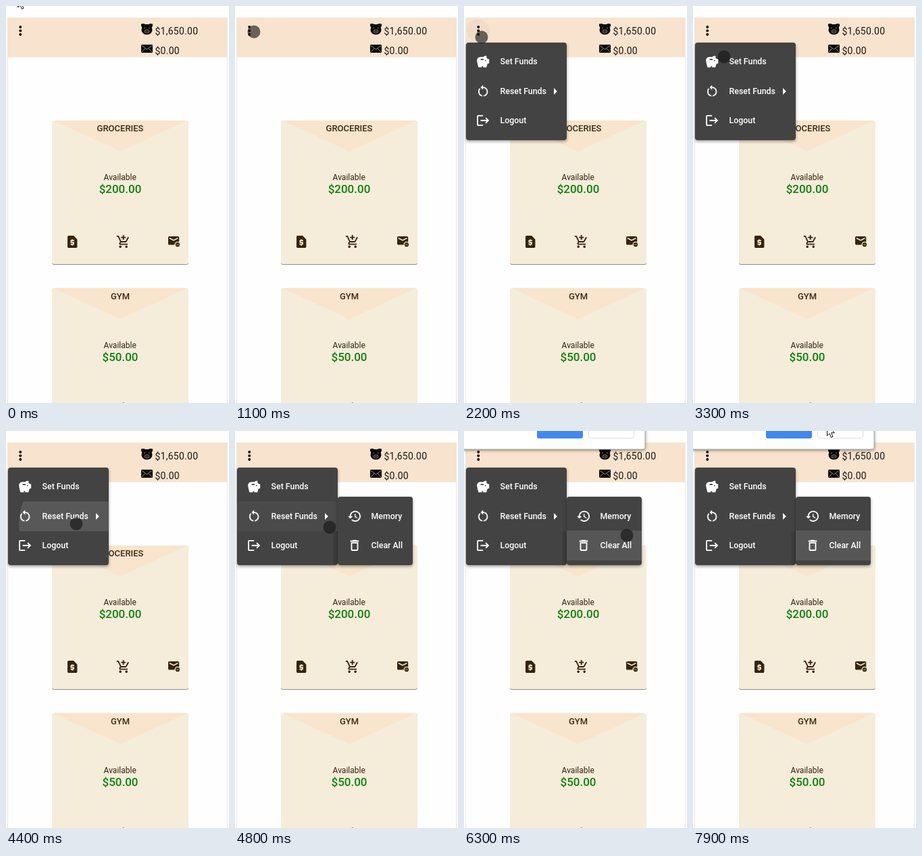
Animation, 330 px wide and 586 px high, one loop 8 s. Source, as an HTML page:

```html
<!DOCTYPE html>
<html lang="en">
<head>
<meta charset="utf-8">
<title>Envelope budget</title>
<style>
html, body { margin: 0; width: 100%; height: 100%; overflow: hidden; background: #fefefe; }
svg { display: block; width: 330px; height: 586px; font-family: Roboto, sans-serif; }
.funds { font-size: 14px; letter-spacing: .25px; fill: #1c1713; }
.name { font-size: 13px; font-weight: 500; text-anchor: middle; fill: #3a2914; }
.label { font-size: 12px; text-anchor: middle; fill: #33230f; }
.price { font-size: 17px; font-weight: 500; text-anchor: middle; fill: #10800f; }
.item { font-size: 12.4px; font-weight: 500; fill: #fff; }
.panel { fill: #434343; filter: drop-shadow(0 2px 2px rgba(0,0,0,.38)); }
.light { fill: #fff; }
.dark { fill: #36240c; }
</style>
</head>
<body>
<svg viewBox="0 0 330 586">
  <defs>
    <path id="quote" d="M14 2H6c-1.1 0-2 .9-2 2v16c0 1.1.9 2 2 2h12c1.1 0 2-.9 2-2V8l-6-6zm1 9h-4v1h3c.55 0 1 .45 1 1v3c0 .55-.45 1-1 1h-1v1h-2v-1H9v-2h4v-1h-3c-.55 0-1-.45-1-1v-3c0-.55.45-1 1-1h1V8h2v1h2v2z"/>
    <path id="cart" d="M11 9h2V6h3V4h-3V1h-2v3H8v2h3v3zm-4 9c-1.1 0-2 .9-2 2s.9 2 2 2 2-.9 2-2-.9-2-2-2zm10 0c-1.1 0-2 .9-2 2s.9 2 2 2 2-.9 2-2-.9-2-2-2zm-9.83-3.25l.03-.12.9-1.63h7.45c.75 0 1.41-.41 1.75-1.03l3.86-7.01L19.42 4h-.01l-1.1 2-2.76 5H8.53l-.13-.27L6.16 6l-.95-2-.94-2H1v2h2l3.6 7.59-1.35 2.45c-.16.28-.25.61-.25.96 0 1.1.9 2 2 2h12v-2H7.42c-.13 0-.25-.11-.25-.25z"/>
    <path id="mail" d="M18.5 13a3.5 3.5 0 1 0 0 7 3.5 3.5 0 0 0 0-7zm2 4h-4v-1h4v1zm-6.95 0c-.02-.17-.05-.33-.05-.5 0-2.76 2.24-5 5-5 .92 0 1.76.26 2.5.69V5c0-1.1-.9-2-2-2H5c-1.1 0-2 .9-2 2v10c0 1.1.9 2 2 2h8.55zM12 10.5L5 7V5l7 3.5L19 5v2l-7 3.5z"/>
    <path id="savings" d="M19.83 7.5l-2.27-2.27c.07-.42.18-.81.32-1.15.08-.18.12-.37.12-.58 0-.83-.67-1.5-1.5-1.5-1.64 0-3.09.79-4 2h-5C4.46 4 2 6.46 2 9.5S4.5 21 4.5 21H10v-2h2v2h5.5l1.68-5.59L22 14.47V7.5h-2.17zM13 9H8V7h5v2zm3 2a1 1 0 1 1 0-2 1 1 0 0 1 0 2z"/>
    <path id="restart" d="M12 5V2L8 6l4 4V7c3.31 0 6 2.69 6 6 0 2.97-2.17 5.43-5 5.91v2.02c3.95-.49 7-3.85 7-7.93 0-4.42-3.58-8-8-8zm-6 8c0-1.65.67-3.15 1.76-4.24L6.34 7.34C4.9 8.79 4 10.79 4 13c0 4.08 3.05 7.44 7 7.93v-2.02c-2.83-.48-5-2.94-5-5.91z"/>
    <path id="logout" d="M17 7l-1.41 1.41L18.17 11H8v2h10.17l-2.58 2.58L17 17l5-5zM4 5h8V3H4c-1.1 0-2 .9-2 2v14c0 1.1.9 2 2 2h8v-2H4V5z"/>
    <path id="history" d="M13 3c-4.97 0-9 4.03-9 9H1l3.89 3.89.07.14L9 12H6c0-3.87 3.13-7 7-7s7 3.13 7 7-3.13 7-7 7c-1.93 0-3.68-.79-4.94-2.06l-1.42 1.42C8.27 19.99 10.51 21 13 21c4.97 0 9-4.03 9-9s-4.03-9-9-9zm-1 5v5l4.28 2.54.72-1.21-3.5-2.08V8H12z"/>
    <path id="bin" d="M6 19c0 1.1.9 2 2 2h8c1.1 0 2-.9 2-2V7H6v12zM8 9h8v10H8V9zm7.5-5l-1-1h-5l-1 1H5v2h14V4h-3.5z"/>
    <clipPath id="resetClip"><path d="M3 104h149v44H3z"/></clipPath>
    <clipPath id="clearClip"><path d="M152 147h111v44H152z"/></clipPath>
    <g id="envelope">
      <rect x="68" y="169" width="202" height="212" rx="3" fill="#f6ecda" style="filter:drop-shadow(0 1px .6px rgba(60,45,50,.55))"/>
      <path d="M70 169H268L169 214.5z" fill="#f9e4cd"/>
      <text class="label" x="168.7" y="257">Available</text>
      <g class="dark">
        <use href="#quote" transform="translate(87.4 337.2) scale(.9)"/>
        <use href="#cart" transform="translate(162.9 337.2) scale(.9)"/>
        <use href="#mail" transform="translate(237.3 337.3) scale(.9)"/>
      </g>
    </g>
  </defs>

  <path d="M2.5 17V586M327.5 17V586" stroke="#e8e8e8"/>
  <rect x="3" y="17" width="324" height="58.5" fill="#f8e3ce"/>
  <circle id="menuRipple" cx="21" cy="36.5"/>
  <g><circle cx="21.3" cy="31" r="1.9"/><circle cx="21.3" cy="36.5" r="1.9"/><circle cx="21.3" cy="42" r="1.9"/></g>

  <path d="M200 26.5q4-1.4 6 .6h5q2-2 6-.6 .8 3-1.3 5.500q1.200 2.500.4 5.500-2 4.700-7.600 4.700t-7.600-4.700q-.8-3 .4-5.500-2.100-2.500-1.300-5.500z" fill="#0b0908"/>
  <ellipse cx="208.500" cy="37.500" rx="3.400" ry="2.400" fill="none" stroke="#a99a8c" stroke-width=".8"/>
  <path d="M204.500 32.500h1.200M211.300 32.500h1.200M207.300 37v1M209.700 37v1" stroke="#cbb9a8" stroke-width="1"/>
  <rect x="200" y="57" width="17" height="12" rx="1" fill="#0b0908"/>
  <path d="M200.500 58l8 6 8-6M200.500 68.500l5.500-6M216.500 68.500l-5.500-6" fill="none" stroke="#b8a797" stroke-width=".8"/>
  <text class="funds" x="220.500" y="42">$1,650.00</text>
  <text class="funds" x="220.500" y="71">$0.00</text>

  <use href="#envelope"/>
  <text class="name" x="169" y="185">GROCERIES</text>
  <text class="price" x="169" y="276">$200.00</text>
  <use href="#envelope" y="247.500"/>
  <text class="name" x="169" y="433">GYM</text>
  <text class="price" x="169" y="524">$50.00</text>

  <g id="menu">
    <rect class="panel" x="3" y="54" width="149" height="144" rx="4"/>
    <circle id="resetRipple" cx="104" cy="137" fill="#fff" clip-path="url(#resetClip)"/>
    <g class="light">
      <use href="#savings" transform="translate(17.400 71.600) scale(.9)"/>
      <use href="#restart" transform="translate(17.400 114.700) scale(.9)"/>
      <use href="#logout" transform="translate(17.400 158.200) scale(.9)"/>
      <path d="M133 121l4.800 5-4.800 5z"/>
    </g>
    <text class="item" x="53.500" y="86">Set Funds</text>
    <text class="item" x="53.500" y="130">Reset Funds</text>
    <text class="item" x="53.500" y="173">Logout</text>
  </g>
  <g id="submenu">
    <path d="M145.500 148h7v49h-7z" fill="#000" opacity=".12"/>
    <rect class="panel" x="152" y="97" width="111" height="101" rx="4"/>
    <circle id="clearRipple" cx="257" cy="186" fill="#fff" clip-path="url(#clearClip)"/>
    <g class="light">
      <use href="#history" transform="translate(166.200 115) scale(.9)"/>
      <use href="#bin" transform="translate(166.200 158) scale(.9)"/>
    </g>
    <text class="item" x="201.500" y="130">Memory</text>
    <text class="item" x="201.500" y="173">Clear All</text>
  </g>

  <g id="touch">
    <circle id="halo" r="11" fill="#141414" opacity=".3"/>
    <circle id="dot" fill="#141414" opacity=".62"/>
  </g>

  <g id="dialog">
    <rect x="-10" y="-10" width="278" height="37" rx="3" fill="#fff" stroke="#a9a9a9" style="filter:drop-shadow(0 1px 2px rgba(0,0,0,.45))"/>
    <rect x="108" y="-15" width="68" height="26" rx="3" fill="#4088ee"/>
    <rect x="184.500" y="-15" width="67" height="25.500" rx="3" fill="#fff" stroke="#dcdfe3"/>
  </g>
  <path id="arrow" d="M.5 .5V16L4 12.700 6.400 18.400 9 17.300 6.600 11.700H11.500z" fill="#fff" stroke="#111"/>
</svg>
<script>
const LOOP = 8000, STEP = 100;
const el = id => document.getElementById(id);

// [ms, x, y]; a row with only a time hides the pointer
const touchPath = [
  [0], [1000, 28, 24], [1100, 28, 38], [1300, 27, 42], [1400, 26, 45], [1500, 26, 46],
  [3300, 46, 75], [3400, 69, 88], [3600, 77, 98], [3700, 88, 114], [3800, 98, 129], [3900, 104, 137],
  [4800, 140, 142], [4900, 180, 151], [5000, 211, 164], [5100, 230, 173], [5200, 263, 199],
  [5500, 258, 189], [5600, 257, 186], [6300, 241, 154], [6400]
];
const arrowPath = [
  [0, 17, -14], [1000], [6800, 226, 20], [6900, 215, 10], [7000, 207, 3], [7100, 203, -2],
  [7300, 201, -4], [7800, 199, -7], [7900, 198, -9]
];
const presses = [[1700, 2000], [4200, 4400], [5500, 5800]];

const at = (path, t) => path.findLast(row => row[0] <= t);
const ramp = (t, from, to) => Math.min(1, Math.max(0, (t - from) / (to - from)));
const show = (id, on) => el(id).style.display = on ? '' : 'none';

function place(id, path, t) {
  const [, x, y] = at(path, t);
  show(id, x !== undefined);
  if (x !== undefined) el(id).setAttribute('transform', `translate(${x} ${y})`);
}

function ripple(id, r, opacity) {
  el(id).setAttribute('r', r);
  el(id).setAttribute('opacity', opacity);
}

function render(time) {
  const t = Math.floor(time % LOOP / STEP) * STEP;
  const pressed = presses.some(([a, b]) => t >= a && t < b);

  place('touch', touchPath, t);
  place('arrow', arrowPath, t);
  show('halo', pressed);
  el('dot').setAttribute('r', pressed ? 8.5 : 9.5);

  show('menu', t >= 2200);
  show('submenu', t >= 4600);
  show('dialog', t >= 6000);

  const menuFade = t < 2000 ? .11 : .03 * (1 - ramp(t, 2300, 2600));
  ripple('menuRipple', 17 * ramp(t, 1500, 1800), menuFade);
  ripple('resetRipple', t < 4300 ? 0 : 40 + 45 * ramp(t, 4300, 4400) + 40 * ramp(t, 4400, 4500),
    .11 * (1 - ramp(t, 4600, 4900)));
  ripple('clearRipple', 130 * ramp(t, 5600, 5800), .1);
}

function tick() {
  render(performance.now());
  requestAnimationFrame(tick);
}
tick();
</script>
</body>
</html>
```
